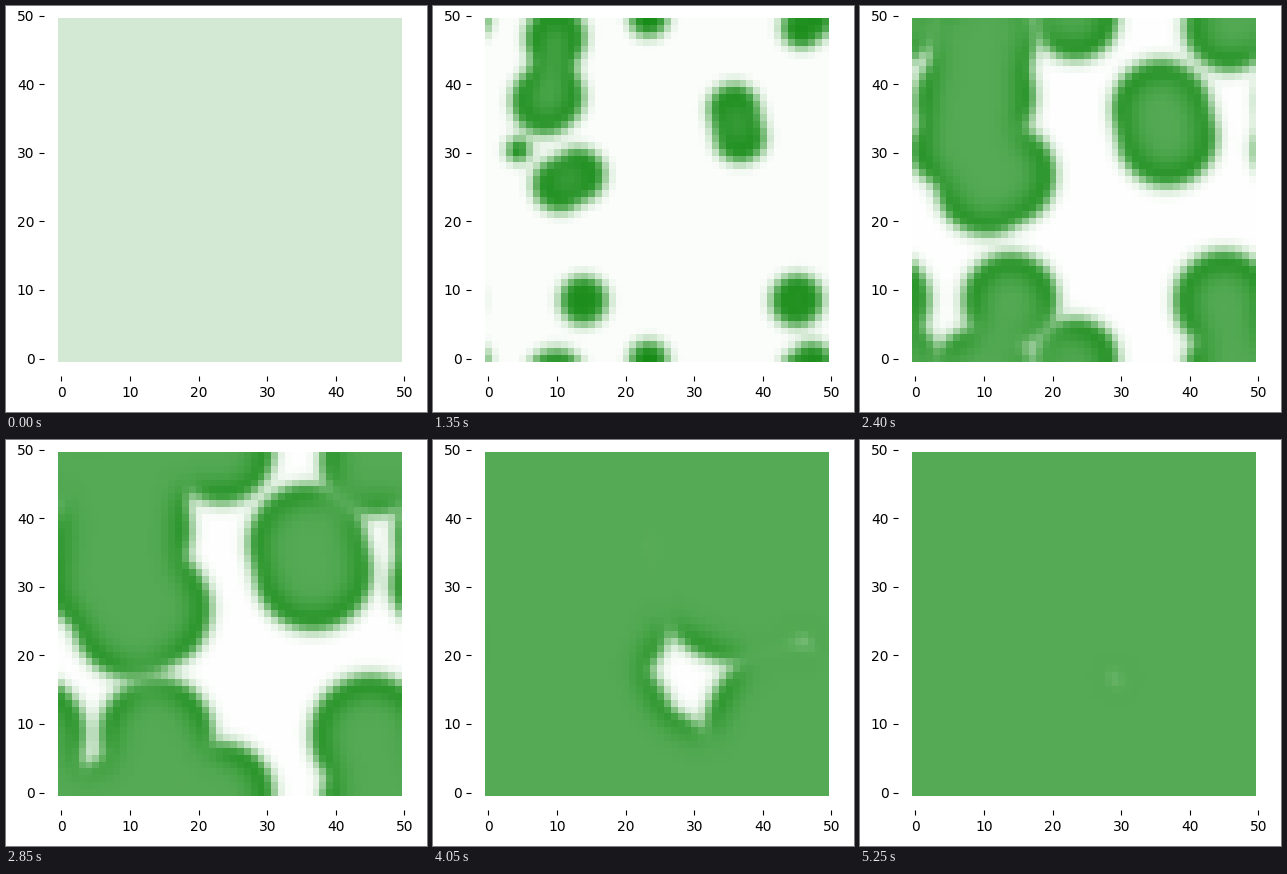
A matplotlib script that plays this animation: 421x406 px, repeating every 5.55 s.

```python
import numpy as np
import matplotlib.pyplot as plt
from matplotlib.animation import FuncAnimation
from matplotlib.colors import LinearSegmentedColormap

W, H, DPI = 421, 406, 100
N, FRAMES, STEP = 50, 37, 150
CELL = 343 / N
START, GROWN = 2, 9          # last uniform step, step with full contrast
BASE, INITIAL = 0.663, 0.169

# Colonies as capsules: x1, y1, x2, y2, radius
COLONIES = [
    (13.8, 8.4, 13.8, 8.5, 3.3),
    (44.8, 8.4, 44.9, 8.5, 3.6),
    (35.7, 36.2, 36.6, 32.2, 3.6),
    (9.8, 46.8, 9.8, 47.0, 4.2),
    (9.2, 40.0, 9.6, 45.0, 3.1),
    (8.2, 37.4, 9.0, 38.0, 4.8),
    (4.3, 30.3, 4.4, 30.4, 1.5),
    (10.4, 25.3, 13.0, 26.7, 3.8),
    (23.3, 49.6, 23.3, 49.7, 2.6),
    (45.6, 48.2, 47.0, 49.3, 2.9),
]

yy, xx = np.mgrid[0:N, 0:N].astype(float)


def wrap(d):
    return (d + N / 2) % N - N / 2


def capsule(x1, y1, x2, y2, r):
    """Signed distance on the periodic grid, positive inside."""
    mx, my = (x1 + x2) / 2, (y1 + y2) / 2
    hx, hy = (x2 - x1) / 2, (y2 - y1) / 2
    px, py = wrap(xx - mx), wrap(yy - my)
    t = np.clip((px * hx + py * hy) / (hx * hx + hy * hy), -1, 1)
    return r - np.hypot(px - t * hx, py - t * hy)


DEPTH = np.array([capsule(*c) for c in COLONIES])

freq = np.fft.fftfreq(N)
BLUR = np.exp(-2 * (np.pi * 2.25) ** 2 * (freq[:, None] ** 2 + freq ** 2))


def blur(a):
    return np.fft.ifft2(np.fft.fft2(a) * BLUR).real


def sigmoid(a):
    return 1 / (1 + np.exp(-a))


def logit(p):
    return np.log(p / (1 - p))


def density(n):
    w = np.clip(np.expm1(0.25 * (n - START)) / np.expm1(0.25 * (GROWN - START)), 0, 1)
    spread = np.interp(n, [9, 13, 19, 23, 27, 35], [0, 2.05, 4.95, 7.4, 9.9, 13.9])
    bare = np.prod(1 - sigmoid(1.85 * (DEPTH + spread)), axis=0)
    level = logit(1 - np.clip(bare, 1e-3, 1 - 1e-6))
    level = np.maximum(level, -4 - 0.15 * max(n - GROWN, 0))
    cover = sigmoid((1 - w) * logit(INITIAL / BASE) + w * level)
    # Growth overshoots where open ground lies close by
    boost = 0.3 * np.tanh(2.6 * np.maximum(blur(1 - cover), 0))
    return cover * (BASE + w * boost)


# The small surplus keeps float rounding from losing a pixel
fig = plt.figure(figsize=((W + 0.01) / DPI, (H + 0.01) / DPI), dpi=DPI,
                 facecolor="white")
side = CELL * (N + 0.5)
ax = fig.add_axes([52 / W, 50 / H, side / W, side / H])
cmap = LinearSegmentedColormap.from_list("growth", ["white", "green"], N=512)
img = ax.imshow(density(0), cmap=cmap, vmin=0, vmax=1, origin="lower",
                extent=(-0.5, N - 0.5, -0.5, N - 0.5),
                interpolation="nearest", aspect="auto")
ax.set(xlim=(-0.5, N), ylim=(-0.5, N))
for name in ("left", "bottom"):
    ax.spines[name].set_position(("outward", 10))
ax.spines[:].set_visible(False)
ax.set_xticks(range(0, N + 1, 10))
ax.set_yticks(range(0, N + 1, 10))
ax.tick_params(labelsize=10, labelfontfamily="DejaVu Sans")


def update(n):
    img.set_data(density(n))
    return [img]


anim = FuncAnimation(fig, update, frames=FRAMES, interval=STEP,
                     repeat=True, repeat_delay=0, blit=False)
plt.show()
```
